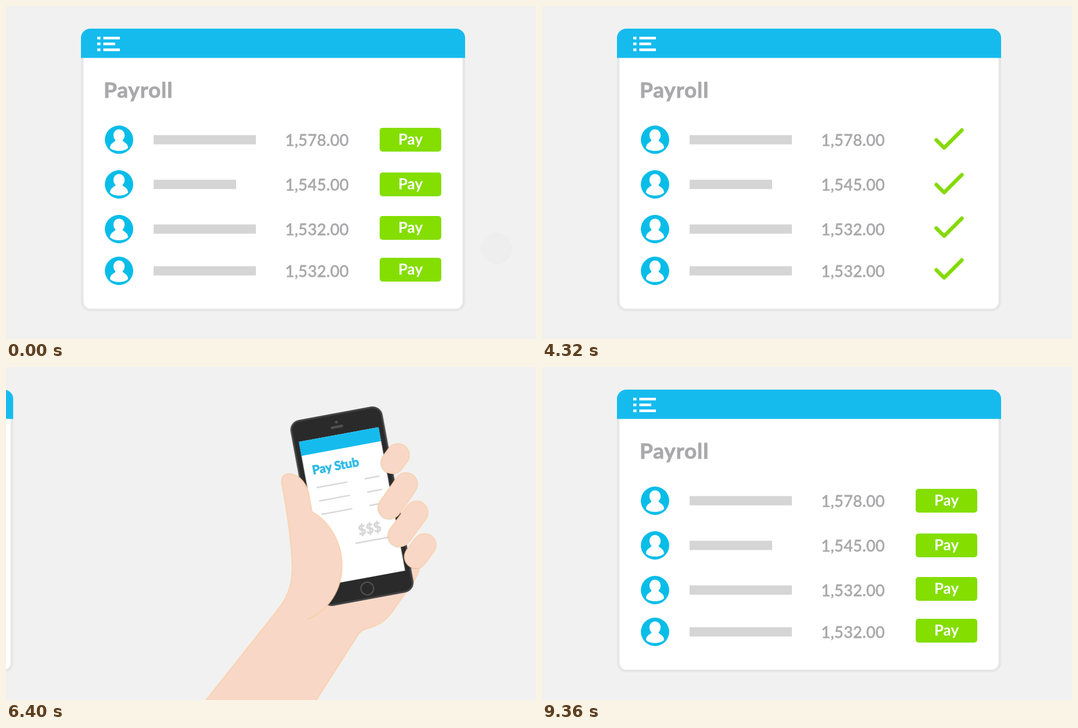
These frames come from a looping animation (912 px wide and 574 px high, 9.4 s). An HTML page:

```html
<!DOCTYPE html>
<html lang="en">
<head>
<meta charset="utf-8">
<title>Payroll</title>
<style>
html, body { margin: 0; width: 100%; height: 100%; overflow: hidden; background: #f1f1f1; }
svg { display: block; width: 912px; height: 574px; font-family: Lato, "Open Sans", sans-serif; }
.title { font-size: 37px; font-weight: 700; letter-spacing: .9px; fill: #a9a9ab; stroke: #a9a9ab; stroke-width: .9; }
.amount { font-size: 27px; letter-spacing: .4px; fill: #a9a9ab; stroke: #a9a9ab; stroke-width: .8; }
.label { font-size: 26px; font-weight: 700; fill: #fff; text-anchor: middle; }
.tick { fill: none; stroke: #84da00; stroke-width: 6.5; stroke-linecap: round; stroke-linejoin: round; }
.skin { fill: #f8d7c6; stroke: #fbcfa4; stroke-width: 1.4; }
.finger path { stroke-linecap: round; }
.rule { stroke: #d8d8da; stroke-width: 2.5; }
</style>
</head>
<body>
<svg viewBox="0 0 912 574">
  <g id="scene">
    <g id="card">
      <rect x="131.2" y="45" width="656.6" height="479" rx="14" fill="#fff" stroke="#e6e6e6" stroke-width="4.5"/>
      <path d="M129 89.6V55a16 16 0 0 1 16-16H774a16 16 0 0 1 16 16V89.6Z" fill="#16bbee"/>
      <path d="M157 55.2h5.5M167.5 55.2H196M157 65.3h5.5M167.5 65.3H188M157 75.5h5.5M167.5 75.5H196" stroke="#fff" stroke-width="4.6"/>
      <text class="title" x="168" y="158">Payroll</text>
      <g id="rows"></g>
    </g>
    <g id="hand">
      <g transform="translate(777)">
        <path class="skin" d="M531 580L606 462Q611 454 622 451C648 445 660 430 668 418L690 387Q710 362 714 340L600 300L485 420L420 500L340 580"/>
        <g transform="translate(596 240) rotate(-10.5)">
          <rect x="-79" y="-161.5" width="158" height="323" rx="16" fill="#2a2a2a" stroke="#454547" stroke-width="3"/>
          <rect x="-69.7" y="-125.7" width="139.4" height="251.4" fill="#fff"/>
          <rect x="-69.7" y="-125.7" width="139.4" height="24.5" fill="#16bbee"/>
          <rect x="-11.5" y="-141.5" width="22" height="4.4" rx="2.2" fill="#505052"/>
          <circle cy="-147.5" r="2.6" fill="#505052"/>
          <circle cy="144.3" r="11" fill="none" stroke="#545456" stroke-width="2"/>
          <text x="-56" y="-66" font-size="21" font-weight="700" fill="#25b8e6" stroke="#25b8e6" stroke-width=".8">Pay Stub</text>
          <path class="rule" d="M-54-42.6h54M-54-19.2h54M-54 4.2h54M30-42.6h26M30-19.2h26M30 4.2h26M-6 64h62"/>
          <text x="3" y="51.5" font-size="23" font-weight="700" fill="#d6d6d8" stroke="#d6d6d8" stroke-width=".8">$$$</text>
        </g>
        <path class="skin" d="M340 580L470 416C490 390 493 367 493 345C492 300 483 240 475 200C474 187 482 183 490 184C507 186 520 203 523 225L527 249C560 268 579 305 579 342C579 385 555 420 519 435"/>
        <g id="fingers" class="finger"></g>
      </g>
    </g>
  </g>
  <g id="cursor"><circle r="27" fill="#b9b9b9" fill-opacity=".7"/></g>
</svg>
<script>
const LOOP = 9400;
const $ = id => document.getElementById(id);
let css = '';

// stops: [time in ms, declarations]
function animate(id, ease, stops) {
  const frames = stops.map(([ms, rule]) => `${(ms / LOOP * 100).toFixed(3)}% { ${rule} }`);
  css += `@keyframes ${id} { ${frames.join(' ')} }
    #${id} { animation: ${id} ${LOOP}ms ${ease} infinite; }\n`;
}

const rows = [
  { y: 230.5, mid: 230.5, bar: 176, sum: '1,578.00' },
  { y: 307.5, mid: 307.5, bar: 142, sum: '1,545.00' },
  { y: 384.5, mid: 382.5, bar: 176, sum: '1,532.00' },
  { y: 456.5, mid: 454.5, bar: 176, sum: '1,532.00' }
];

$('rows').innerHTML = rows.map(({ y, mid, bar, sum }, i) => `
  <g transform="translate(194.5 ${y})">
    <circle r="24.4" fill="#08bde8"/>
    <ellipse cy="-7.5" rx="9.7" ry="10.5" fill="#fff"/>
    <path d="M-15.5 14C-15.5 5-7 5-5.5 0H5.5C7 5 15.5 5 15.5 14C10 21-10 21-15.5 14Z" fill="#fff"/>
  </g>
  <rect x="254" y="${y - 8}" width="${bar}" height="16" fill="#d5d5d5"/>
  <text class="amount" x="480.5" y="${y + 10.5}">${sum}</text>
  <g transform="translate(696 ${mid})">
    <g id="pay${i}">
      <rect x="-53" y="-20.5" width="106" height="41" rx="5" fill="#84de00"/>
      <text class="label" y="8">Pay</text>
    </g>
    <g id="tick${i}"><path class="tick" d="M-17.5.5L-4 14L26.5-16.5"/></g>
  </g>`).join('');

$('fingers').innerHTML = [
  'M675 152L666 164', 'M689 202L661 242', 'M707 251L678 290', 'M721 307L706 327'
].map(d => `
  <path d="${d}" stroke="#000" stroke-opacity=".1" stroke-width="40" transform="translate(-1.5 1.5)"/>
  <path d="${d}" stroke="#fbcfa4" stroke-width="41"/>
  <path d="${d}" stroke="#f8d7c6" stroke-width="38.4"/>`).join('');

const place = (x, y, s, o) => `transform: translate(${x}px, ${y}px) scale(${s}); opacity: ${o}`;
const size = (s, o) => `transform: scale(${s}); opacity: ${o}`;
const RESET = 8440;

const path = [[0, place(844, 418, 1, .08)], [160, place(844, 418, 1, .08)]];
rows.forEach(({ mid }, i) => {
  const hit = 960 * (i + 1), y = mid - .5;
  path.push(
    [hit - 240, place(696, y, 1.15, 1)],
    [hit, place(696, y, .93, 1)],
    [hit + 80, place(696, y, .9, 1)],
    [hit + 160, place(696, y, 1.05, 1)]);
  animate('pay' + i, 'linear', [
    [0, size(1, 1)], [hit - 80, size(1, 1)], [hit, size(.98, 1)], [hit + 80, size(.89, 1)],
    [hit + 240, size(.2, 0)], [RESET - 1, size(.2, 0)], [RESET, size(1, 1)], [LOOP, size(1, 1)]]);
  animate('tick' + i, 'ease-out', [
    [0, size(0, 0)], [hit + 120, size(0, 0)], [hit + 240, size(.7, 1)], [hit + 480, size(1, 1)],
    [RESET - 1, size(1, 1)], [RESET, size(0, 0)], [LOOP, size(0, 0)]]);
});
const gone = place(696, rows[3].mid - .5, 1.1, 0);
path.push([4320, gone], [LOOP, gone]);
animate('cursor', 'ease-in-out', path);

const home = 'transform: translateX(0)', away = 'transform: translateX(-901px)';
animate('scene', 'cubic-bezier(.65, 0, .36, 1)', [
  [0, home], [5720, home], [6720, away], [RESET - 1, away], [RESET, home], [LOOP, home]]);
animate('hand', 'linear', [
  [0, 'opacity: 1'], [7480, 'opacity: 1'], [8400, 'opacity: 0'], [LOOP, 'opacity: 0']]);
animate('card', 'linear', [
  [0, 'opacity: 1'], [RESET - 1, 'opacity: 1'], [RESET, 'opacity: 0'], [9360, 'opacity: 1'], [LOOP, 'opacity: 1']]);

document.head.appendChild(document.createElement('style')).textContent = css;
</script>
</body>
</html>
```
